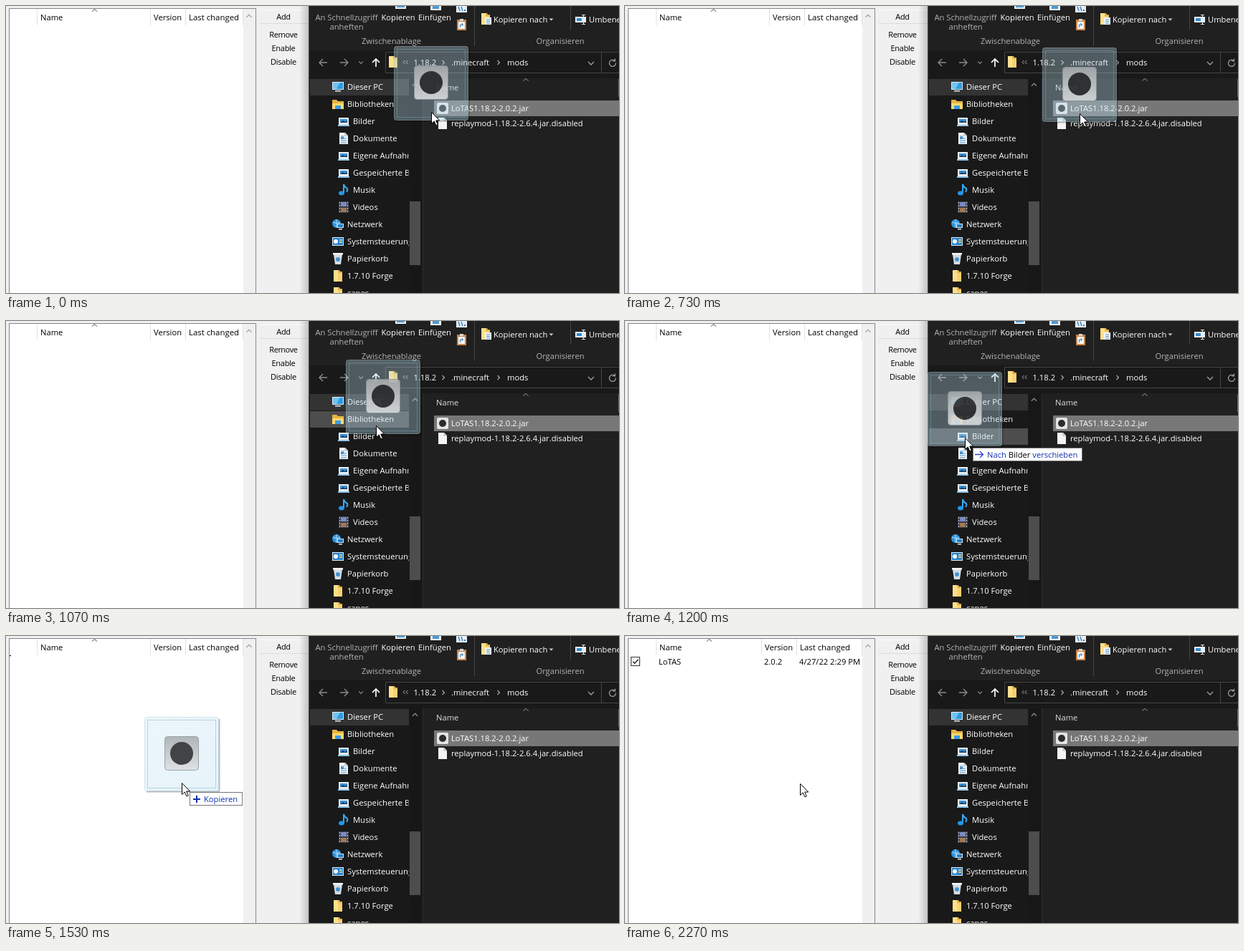
An HTML page for the animation above (4990 ms loop, 855x401 px).

```html
<!DOCTYPE html>
<html lang="de">
<head>
<meta charset="utf-8">
<title>Drag and drop</title>
<style>
html, body { margin: 0; width: 100%; height: 100%; overflow: hidden; background: #f0f0f0; }
svg { display: block; width: 855px; height: 401px; font: 11.2px "Open Sans", "Noto Sans", sans-serif; }
text { white-space: pre; }
</style>
</head>
<body>
<svg id="stage" viewBox="0 0 855 401">
  <defs>
    <linearGradient id="glass" x1="0" y1="0" x2="1" y2="1">
      <stop offset="0" stop-color="#c4e4f2" stop-opacity=".32"/>
      <stop offset="1" stop-color="#b6def0" stop-opacity=".35"/>
    </linearGradient>
    <linearGradient id="metal" x1="0" y1="0" x2="0" y2="1">
      <stop offset="0" stop-color="#a9adb0"/>
      <stop offset="1" stop-color="#dde0e2"/>
    </linearGradient>
    <linearGradient id="shade">
      <stop offset="0" stop-color="#000" stop-opacity="0"/>
      <stop offset="1" stop-color="#000" stop-opacity=".2"/>
    </linearGradient>
    <clipPath id="side"><rect x="424" y="100" width="137.5" height="301"/></clipPath>
  </defs>
  <g id="list"></g>
  <g id="explorer"></g>
  <g id="drag"></g>
  <path id="cursor" d="M.5 .5V16.5L4.2 13L6.9 18.9L9.3 17.8L6.7 12H11.7Z" fill="#fff" stroke="#000"/>
</svg>
<script>
const $ = id => document.getElementById(id);
const LOOP = 4990, WHITE = '#fff', GREY = '#b4b4b4', BLUE = '#1030b0';

const rect = (x, y, w, h, fill, more = '') =>
  `<rect x="${x}" y="${y}" width="${w}" height="${h}" fill="${fill}" ${more}/>`;
const line = (d, color, w = 1) =>
  `<path d="${d}" fill="none" stroke="${color}" stroke-width="${w}"/>`;
const shape = (d, fill) => `<path d="${d}" fill="${fill}"/>`;
const disc = (x, y, r, fill) => `<circle cx="${x}" cy="${y}" r="${r}" fill="${fill}"/>`;
// y is the vertical middle of the line of text
const text = (x, y, s, fill = '#000', more = '') =>
  `<text x="${x}" y="${y + 4}" fill="${fill}" ${more}>${s}</text>`;
const mid = 'text-anchor="middle"';
const at = (x, y, s) => `<g transform="translate(${x} ${y})">${s}</g>`;

// Icons, centred on 0,0
const screen =
  rect(-8, -7, 16, 11, '#dcebf5') + rect(-7, -6, 14, 9, '#2f9be0') +
  shape('M-7-6h10l-5 9h-5z', '#6fc4f2') + rect(-4, 5, 8, 1.5, '#dcebf5');
const picture =
  rect(-7, -5, 14, 10, '#e9eff4') + rect(-5, -3, 10, 5, '#3d8fd0') +
  shape('M-5 2l4-3 3 2 3-2v3z', '#163f66') + rect(-8, 5, 16, 2, '#8fc4ea');
const folder =
  shape('M-6-8h8l1 2h3v14h-12z', '#e3b34c') + shape('M-6-8h6v16h-6z', '#ffe08a') + rect(0, -4, 6, 12, '#f8d272');
const library =
  shape('M-8-6h6l2 2h8v10h-16z', '#e8b43f') + rect(-8, -1, 16, 8, '#ffd96e') + rect(-4, 2, 8, 5, '#3b9ce2');
const sheet =
  shape('M-6-8h8l4 4v12h-12z', '#f4f4f4') + line('M2-8v4h4', '#a8a8a8');
const note =
  line('M0 4V-8Q1-4 5-2Q6 0 4 3', '#39a7ee', 2) + '<ellipse cx="-3" cy="4.5" rx="4" ry="3" fill="#2497e6"/>';
const film =
  rect(-7, -8, 14, 16, '#3a3f4c') + rect(-4, -7, 8, 6, '#7b8cc4') + rect(-4, 1, 8, 6, '#a17852') +
  line('M-5.5-7V8M5.5-7V8', '#cfd3da', '1" stroke-dasharray="2 2');
const net =
  disc(-2, -1, 6, '#2f93dc') + line('M-7-3q5 3 10 0M-2-7v12', '#a6dcff') +
  rect(-1, -1, 9, 6, '#d6e8f4') + rect(0, 0, 7, 4, '#1f7fc8') + rect(1, 6, 5, 1.5, '#d6e8f4');
const panel =
  rect(-8, -6, 16, 12, '#dcebf5') + rect(-7, -5, 14, 10, '#2482cc') + disc(-3, 0, 3, WHITE) +
  line('M2-2h4M2 1h4', '#ffe28a', 1.5);
const bin =
  shape('M-6-6h12l-2 14h-8z', '#d7dce0') + rect(-7, -8, 14, 2.5, '#f3f5f6') + disc(0, 1, 3, '#3f94d6');
const jar = rect(-8, -8, 16, 16, '#e2e4e6', 'rx="2"') + disc(0, 0, 5, '#2b2b2b');
const docs = sheet + line('M-4-3h5M-4 0h8M-4 3h8M-4 6h8', '#3f8fd2') + rect(-4, -2, 4, 3, '#3f8fd2');

const chevron = (x, y, color, w = 3.5, up = 1, sw = 1.3) =>
  line(`M${x - w} ${y + up * w / 2}L${x} ${y - up * w / 2}L${x + w} ${y + up * w / 2}`, color, sw);
const right = (x, y) => line(`M${x - 1.5} ${y - 3}l3 3l-3 3`, '#b0b0b0', 1.1);

const rows = [
  ['Dieser PC', screen], ['Bibliotheken', library],
  ['Bilder', picture, 1], ['Dokumente', docs, 1], ['Eigene Aufnahmen', picture, 1],
  ['Gespeicherte Bilder', picture, 1], ['Musik', note, 1], ['Videos', film, 1],
  ['Netzwerk', net], ['Systemsteuerung', panel], ['Papierkorb', bin],
  ['1.7.10 Forge', folder], ['capes', folder]
];
const rowY = i => 113 + 24 * i;

function explorer(hover) {
  let s = rect(423, 0, 432, 401, '#191919') + rect(423, 0, 432, 62, '#202020') + rect(582, 101, 273, 300, '#202020');
  s += rect(422, 0, 1, 401, '#4a4a4a');

  // Ribbon
  s += text(475, 16, 'An Schnellzugriff', GREY, mid) + text(475, 29, 'anheften', GREY, mid);
  s += text(547, 16, 'Kopieren', WHITE, mid) + text(598, 16, 'Einfügen', WHITE, mid);
  s += text(537.5, 49, 'Zwischenablage', GREY, mid) + text(773, 49, 'Organisieren', GREY, mid);
  s += rect(543, 0, 15, 4, '#eef3f7') + rect(545, 0, 11, 2, '#4a9ad6');
  s += rect(592, 0, 15, 6, '#f0f0f0') + rect(595, 0, 9, 4, '#4a9ad6');
  s += rect(628, 0, 15, 9, '#e8eef3') + line('M631 1l2 6M635 1l2 6', '#2b78bd', 1.3) + rect(639, 5, 2, 2, '#2b78bd');
  s += rect(629, 19, 13, 15, '#c9854a') + rect(631, 22, 9, 10, '#f6f6f6') + rect(633, 18, 5, 3, '#d8d8d8') +
    line('M633.5 30v-4h4M635.5 24l2 2l-2 2', '#2b78bd');
  s += rect(653, 0, 1, 56, '#454545') + rect(787, 0, 1, 33, '#454545');
  s += at(669, 18, folder) + rect(668, 16, 9, 10, '#f2f2f2') + line('M670 19h5M670 21.5h5M670 24h5', '#4a9ad6');
  s += text(680, 19, 'Kopieren nach', WHITE) + shape('M757.5 17.5h6l-3 3z', '#d0d0d0');
  s += rect(794, 15, 15, 8, '#e8eef3') + rect(796, 17, 7, 4, '#2f8ad2') + line('M803 12.5h5M803 25.5h5M805.5 12v14', '#e8e8e8');
  s += text(813, 19, 'Umbenennen', WHITE);

  // Address bar
  s += line('M448 79h-11M442 74l-5 5l5 5M466 79h11M472 74l5 5l-5 5', '#8a8a8a', 1.4);
  s += chevron(495, 79, '#8a8a8a', 2.8, -1) + line('M516 85V74M511 79l5-5l5 5', WHITE, 1.7);
  s += line('M856 64.5H529.5V93.5H856M830.5 65v28', '#464646');
  s += at(540, 78, folder) + line('M556.5 76l-2.5 2.5l2.5 2.5M560.5 76l-2.5 2.5l2.5 2.5', '#b0b0b0');
  s += text(568.5, 79, '1.18.2', WHITE) + right(610, 79) + text(621, 79, '.minecraft', WHITE) + right(687, 79) + text(699, 79, 'mods', WHITE);
  s += chevron(816, 80, '#a0a0a0', 4, -1) + line('M849 76.5a4.5 4.5 0 1 0 1.5 3M849.5 73.5v3.5h-3.5', '#a0a0a0', 1.2);

  // Navigation pane
  s += rect(424, 102, 138, 23, '#333');
  if (hover >= 0) s += rect(424, rowY(hover) - 11, 138, 23, '#4d4d4d');
  s += '<g clip-path="url(#side)">' + rows.map(([name, icon, sub], i) =>
    at(sub ? 471 : 463, rowY(i), icon) + text(sub ? 484 : 476, rowY(i), name, WHITE)).join('') + '</g>';
  s += rect(563, 101, 16, 300, '#171717') + rect(563, 273, 15, 89, '#4d4d4d') + chevron(570.5, 110, '#8a8a8a', 3.5);
  s += rect(581, 101, 1, 300, '#2b2b2b');

  // Files
  s += chevron(725, 103, '#a0a0a0', 3.5, 1, 1) + text(600, 114, 'Name', '#dedede') + rect(854, 102, 1, 25, '#636363');
  s += rect(597, 132, 258, 22, '#777');
  s += at(609, 143, jar) + text(621, 143, 'LoTAS1.18.2-2.0.2.jar', WHITE);
  s += at(609, 164, sheet) + text(621, 164, 'replaymod-1.18.2-2.6.4.jar.disabled', WHITE);
  return s;
}

function modList(filled, marker) {
  const [a, b] = filled ? [190, 239] : [201, 250];
  let s = rect(0, 0, 423, 401, '#f0f0f0') + rect(4, 3, 345, 398, '#828790') + rect(5, 4, 343, 397, WHITE);
  s += rect(331, 4, 17, 397, '#f0f0f0') + chevron(339, 14, '#a6a6a6', 3.5);
  s += [43, a, b, 330].map(x => rect(x, 4, 1, 23, '#e2e2e2')).join('');
  s += chevron(filled ? 117.5 : 123.5, 6, '#444', 3.5, 1, 1);
  s += text(48, 16, 'Name') + text(a + 5, 16, 'Version') + text(b + 5, 16, 'Last changed', '#000', 'font-size="11.4"');
  if (marker) s += rect(5, 27, 2, 1, '#000');
  if (filled) {
    s += rect(8.5, 29.5, 12, 12, WHITE, 'stroke="#333"') + line('M11 35.5l2.5 2.7l5-5.5', '#222', 1.4);
    s += text(47, 36, 'LoTAS') + text(194, 36, '2.0.2') + text(243, 36, '4/27/22 2:29 PM');
  }
  s += rect(354, 5, 68, 1, '#fafafa') + rect(354, 24, 68, 1, '#dcdcdc');
  s += ['Add', 'Remove', 'Enable', 'Disable'].map((name, i) =>
    text(387, [15, 40, 59, 78][i], name, '#000', mid + ' font-size="11" letter-spacing="-.3"')).join('');
  return s + rect(409, 0, 14, 401, 'url(#shade)');
}

const tile =
  line('M104.5 3V102.5Q104.5 104.5 102.5 104.5H3', '#0004', 2) +
  rect(.5, .5, 103, 103, 'url(#glass)', 'rx="3" stroke="#a9c6d2" stroke-opacity=".45"') +
  rect(4.5, 4.5, 95, 95, 'none', 'stroke="#7fa9ba" stroke-opacity=".45"') +
  '<g opacity=".88">' + rect(28.5, 27.5, 47, 47, 'url(#metal)', 'rx="4" stroke="#8f979c"') + disc(52, 51, 16, '#2b2b2b') + '</g>';

const noDrop = disc(0, 0, 7, '#f3e4e4') +
  '<circle r="5.8" fill="none" stroke="#a8343a" stroke-width="2.2"/>' + line('M-4-4L4 4', '#a8343a', 2.2);

function tip(target) {
  const copy = target === 'copy';
  const label = copy ? 'Kopieren'
    : `Nach <tspan fill="#000">${rows[target][0]}</tspan> verschieben`;
  return rect(.5, .5, 10, 18, WHITE, 'id="box" stroke="#767676"') +
    (copy ? line('M5 10h10M10 5v10', BLUE, 2) : line('M3 9.5h11M10 5l4.5 4.5l-4.5 4.5', '#3a3ad0', 1.3)) +
    text(20, 9.5, label, BLUE, 'id="label"');
}

// start, pointer x, pointer y, hovered row, badge
const path = [
  [0, 593, 148], [130, 587, 149], [200, 597, 152], [270, 621, 160], [330, 639, 165],
  [400, 647, 166], [530, 652, 166], [600, 641, 165], [670, 639, 158], [730, 634, 150],
  [800, 617, 148], [870, 592, 147], [930, 567, 147, -1, 'no'], [1000, 542, 147, 1],
  [1070, 516, 146, 1], [1130, 491, 146, 1, 1], [1200, 474, 163, 2, 2], [1270, 437, 178, 3, 3],
  [1330, 388, 190, -1, 'no'], [1400, 322, 199, -1, 'copy'], [1470, 264, 204, -1, 'copy'],
  [1530, 245, 205, -1, 'copy']
];
const DROP = 2130, DONE = 2270;

// The tile trails the pointer when it moves fast
function trail(step) {
  const dx = step ? path[step - 1][1] - path[step][1] : 0;
  return Math.abs(dx) > 20 ? Math.round(dx * .4) : 0;
}

let shown = '';
function draw(t) {
  const step = path.findLastIndex(p => p[0] <= t);
  const [, x, y, hover = -1, badge] = path[step];
  const dropped = t >= DROP, done = t >= DONE;
  const key = [step, dropped, done].join();
  if (key === shown) return;
  shown = key;

  $('list').innerHTML = modList(done, badge === 'copy' && !dropped);
  $('explorer').innerHTML = explorer(hover);
  let s = '';
  if (!dropped) {
    const lag = trail(step);
    s = at(x + lag - 52, y - 92, tile);
    if (badge === 'no') s += at(x + lag + 21, y + 23, noDrop);
    else if (badge !== undefined) s += at(x + 11, y + 14 - (badge === 'copy'), tip(badge));
  }
  $('drag').innerHTML = s;
  if ($('label')) $('box').setAttribute('width', Math.round($('label').getComputedTextLength()) + 26);
  $('cursor').setAttribute('transform', `translate(${x - dropped} ${y + dropped})`);
}

const start = performance.now();
function tick() {
  draw((performance.now() - start) % LOOP);
  requestAnimationFrame(tick);
}
tick();
</script>
</body>
</html>
```
